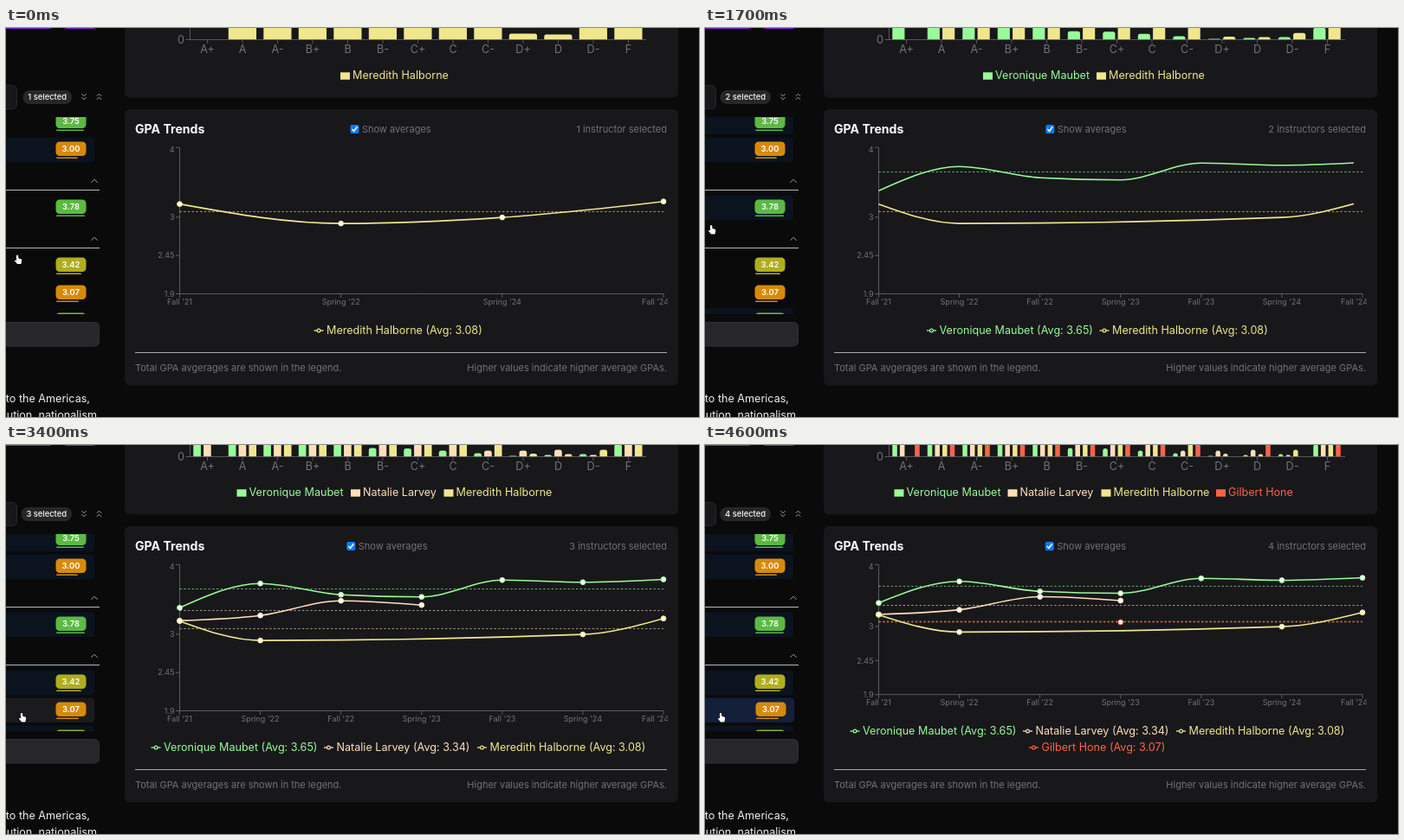
These frames come from a looping animation (800 by 450 pixels, 4700 ms). An HTML page with a canvas:

```html
<!DOCTYPE html>
<html lang="en">
<head>
<meta charset="utf-8">
<title>GPA Trends</title>
<style>
html, body { margin: 0; width: 100%; height: 100%; overflow: hidden; background: #0a0a0b; }
canvas { display: block; width: 800px; height: 450px; }
</style>
</head>
<body>
<canvas id="stage" width="800" height="450"></canvas>
<script>
const ctx = document.getElementById('stage').getContext('2d');
const LOOP = 4700, DRAW = 900;
const CLICKS = [957, 2342, 3462];
const ZOOM = 0.786; // layout pixels to stage pixels
const GRADES = ['A+', 'A', 'A-', 'B+', 'B', 'B-', 'C+', 'C', 'C-', 'D+', 'D', 'D-', 'F'];
const TERMS = ["Fall '21", "Spring '22", "Fall '22", "Spring '23", "Fall '23", "Spring '24", "Fall '24"];

// from: the state in which the instructor is first selected; gpa: [term, value]
const PEOPLE = [
  { name: 'Veronique Maubet', color: '#98fb98', from: 1, avg: 3.65,
    bars: [90, 60, 57, 25, 22, 10, 9.5, 7, 4, 1, 2, 3, 14],
    gpa: [[0, 3.38], [1, 3.728], [2, 3.567], [3, 3.536], [4, 3.777], [5, 3.746], [6, 3.787]] },
  { name: 'Natalie Larvey', color: '#ffdfb8', from: 2, avg: 3.34,
    bars: [40, 80, 70, 60, 50, 30, 24, 28, 7, 7, 8, 2, 24],
    gpa: [[0, 3.195], [1, 3.269], [2, 3.48], [3, 3.418]] },
  { name: 'Meredith Halborne', color: '#f0e68c', from: 0, avg: 3.08,
    bars: [0, 90, 75, 65, 70, 34, 25, 18, 20, 3.5, 3, 8, 17],
    gpa: [[0, 3.189], [1, 2.91], [5, 2.997], [6, 3.226]] },
  { name: 'Gilbert Hone', color: '#ff6347', from: 3, avg: 3.07,
    bars: [16, 60, 27, 23, 45, 22, 40, 40, 40, 0, 23, 0, 24],
    gpa: [[3, 3.07]] }
];
const BAR_LEGEND = [[386], [321, 452], [266.5, 398, 505.5], [218.5, 349.5, 457.5, 590]];
const LINE_LEGEND = [[355.5], [256, 455.5], [167.5, 367, 544], [167.5, 367, 544, 374]];

const GREEN = '#5cb944', ORANGE = '#d68a0c', OLIVE = '#b0ae1f';
const ROWS = [
  { y: 94, gpa: '3.75', color: GREEN, bar: 32, from: 1 },
  { y: 126, gpa: '3.00', color: ORANGE, bar: 25, from: 0 },
  { y: 193, gpa: '3.78', color: GREEN, bar: 33, from: 1 },
  { y: 260, gpa: '3.42', color: OLIVE, bar: 29, from: 2 },
  { y: 292, gpa: '3.07', color: ORANGE, bar: 26, from: 3 },
  { y: 324, gpa: '3.65', color: '#86b52c', bar: 31, from: 1 }
];
// start time, end time, destination of the fingertip
const MOVES = [[300, 850, 1.5, 210.5], [1500, 2100, 23, 277.3], [2750, 3150, 18, 309.8]];

function text(str, x, y, size, color, align = 'left', weight = 400) {
  ctx.font = `${weight} ${size}px Inter, sans-serif`;
  ctx.textAlign = align;
  ctx.fillStyle = color;
  ctx.fillText(str, x, y);
}

function box(x, y, w, h, r, fill, stroke) {
  ctx.beginPath();
  ctx.roundRect(x, y, w, h, r);
  ctx.fillStyle = fill;
  ctx.fill();
  if (stroke) { ctx.lineWidth = 1; ctx.strokeStyle = stroke; ctx.stroke(); }
}

function line(points, color, width = 1) {
  ctx.beginPath();
  points.forEach(([x, y]) => ctx.lineTo(x, y));
  ctx.strokeStyle = color;
  ctx.lineWidth = width;
  ctx.stroke();
}

function dot(x, y, r, fill, stroke, width = 1) {
  ctx.beginPath();
  ctx.arc(x, y, r, 0, 7);
  ctx.fillStyle = fill;
  ctx.fill();
  ctx.strokeStyle = stroke;
  ctx.lineWidth = width;
  ctx.stroke();
}

function clipped(x, y, w, h, draw) {
  ctx.save();
  ctx.beginPath();
  ctx.rect(x, y, w, h);
  ctx.clip();
  draw();
  ctx.restore();
}

// cubic-bezier(.25, .1, .25, 1)
function ease(t) {
  if (t >= 1) return 1;
  let lo = 0, hi = 1, s = 0.5;
  for (let i = 0; i < 20; i++) {
    s = (lo + hi) / 2;
    if (0.75 * s * (1 - s) + s ** 3 < t) lo = s; else hi = s;
  }
  return 0.3 * s * (1 - s) ** 2 + 3 * s * s * (1 - s) + s ** 3;
}

function monotoneCurve(pts) {
  const n = pts.length - 1;
  const h = [], s = [], m = [];
  for (let i = 0; i < n; i++) {
    h[i] = pts[i + 1][0] - pts[i][0];
    s[i] = (pts[i + 1][1] - pts[i][1]) / h[i];
  }
  for (let i = 1; i < n; i++) {
    const p = (s[i - 1] * h[i] + s[i] * h[i - 1]) / (h[i - 1] + h[i]);
    m[i] = (Math.sign(s[i - 1]) + Math.sign(s[i])) *
      Math.min(Math.abs(s[i - 1]), Math.abs(s[i]), Math.abs(p) / 2);
  }
  m[0] = (3 * s[0] - m[1]) / 2;
  m[n] = (3 * s[n - 1] - m[n - 1]) / 2;
  ctx.beginPath();
  ctx.moveTo(...pts[0]);
  for (let i = 0; i < n; i++) {
    const [x0, y0] = pts[i], [x1, y1] = pts[i + 1], d = h[i] / 3;
    ctx.bezierCurveTo(x0 + d, y0 + m[i] * d, x1 - d, y1 - m[i + 1] * d, x1, y1);
  }
}

function cursorAt(t) {
  let x = 13, y = 262.5;
  for (const [start, end, toX, toY] of MOVES) {
    const u = Math.min(1, Math.max(0, (t - start) / (end - start)));
    const k = u * u * (3 - 2 * u);
    x += (toX - x) * k;
    y += (toY - y) * k;
  }
  return [x, y];
}

function drawCursor([x, y]) {
  ctx.save();
  ctx.translate(x, y);
  ctx.beginPath();
  ctx.moveTo(-1.2, 1);
  ctx.quadraticCurveTo(0, -1, 1.2, 1);
  ctx.lineTo(1.4, 4);
  ctx.lineTo(4.4, 4.8);
  ctx.quadraticCurveTo(5.4, 5.2, 5.2, 7);
  ctx.lineTo(4.4, 10.6);
  ctx.lineTo(0, 10.6);
  ctx.lineTo(-3, 7);
  ctx.quadraticCurveTo(-3, 5.4, -1, 6.4);
  ctx.closePath();
  ctx.strokeStyle = '#000';
  ctx.lineWidth = 1.4;
  ctx.stroke();
  ctx.fillStyle = '#fff';
  ctx.fill();
  ctx.restore();
}

function chevron(x, y, dir, r = 3) {
  line([[x - r, y - dir * r / 2], [x, y + dir * r / 2], [x + r, y - dir * r / 2]], '#a1a1aa');
}

function drawSidebar(state, cursor) {
  box(-20, -20, 74, 21, 4, '#7e22ce');
  box(66.5, -20, 38, 21, 4, '#7e22ce');
  box(-10, 66.5, 22.5, 27, 5, '#18181b', '#27272a');

  const label = `${state + 1} selected`;
  ctx.font = '500 9.4px Inter, sans-serif';
  const w = ctx.measureText(label).width;
  box(64 - w, 72, w + 12, 16, 8, '#27272a');
  text(label, 70, 83.3, 9.4, '#fafafa', 'right', 500);
  for (const d of [-2, 2]) {
    chevron(90, 79.5 + d, 1, 2.6);
    chevron(107.5, 79.5 + d, -1, 2.6);
  }

  clipped(0, 103, 110, 228, () => {
    for (const row of ROWS) {
      const selected = state >= row.from;
      const hover = cursor[1] > row.y + 4 && cursor[1] < row.y + 29;
      const dx = selected && hover ? 1 : 0;
      if (selected || hover) {
        const fill = !selected ? '#1b1b1e' : hover ? '#14203a' : '#0a131e';
        box(-10, row.y + 0.5, 112 + dx, 28.5, 4, fill);
      }
      box(57.5 + dx, row.y + 5.5, 35, 16.5, 4.5, row.color);
      text(row.gpa, 75 + dx, row.y + 17, 9.4, '#fff', 'center', 600);
      box(58 + dx, row.y + 23.4, row.bar, 1.6, 0.8, row.color);
    }
  });
  for (const y of [177, 244]) {
    chevron(102, y, -1, 3.6);
    line([[0, y + 10.5], [108, y + 10.5]], '#b8b8bc');
  }
  box(-10, 340.5, 117.5, 27.5, 5, '#27272a', '#303034');
  text('to the Americas,', 97, 433, 12.6, '#f0f0f0', 'right');
  text('ution, nationalism', 105, 451.5, 12.6, '#f0f0f0', 'right');
}

function drawBars(state, people, progress) {
  box(137, -20, 639, 100.5, 6, '#18181b');
  const step = 40.5, n = people.length;
  const gap = 4 * ZOOM;
  const width = Math.floor((step * 0.8 / ZOOM - 4 * (n - 1)) / n) * ZOOM;
  // bars grow from zero unless their slot already held the same person
  const before = PEOPLE.filter(p => p.from < state);
  GRADES.forEach((grade, i) => {
    const mid = 232.5 + i * step;
    people.forEach((p, k) => {
      const h = p.bars[i] * (state === 0 ? 2 : before[k] === p ? 1 : progress);
      const x = mid - step * 0.4 + k * (width + gap);
      const r = Math.min(2.5, h, width / 2);
      if (h) box(x, 13.5 - h, width, h, [r, r, 0, 0], p.color);
    });
    line([[mid, 13.5], [mid, 18]], '#666', 0.8);
    text(grade, mid, 28.5, 12.6, '#71717a', 'center');
  });
  line([[207.5, 13.5], [739, 13.5]], '#666', 0.8);
  line([[212.5, 0], [212.5, 13.5]], '#666', 0.8);
  text('0', 206, 18, 12.6, '#71717a', 'right');
  people.forEach((p, k) => {
    const x = BAR_LEGEND[state][k];
    box(x, 51.3, 11, 8.4, 0, p.color);
    text(p.name, x + 14, 59.3, 12.6, p.color);
  });
}

function drawTrends(state, people, progress) {
  const left = 200.5, right = 759, top = 138.3;
  const bottom = state === 3 ? 288.7 : 307.5;
  const terms = state ? TERMS : [0, 1, 5, 6].map(i => TERMS[i]);
  const termX = i => left + (right - left) * terms.indexOf(TERMS[i]) / (terms.length - 1);
  const gpaY = v => bottom - (v - 1.9) / 2.1 * (bottom - top);
  const gray = '#71717a';

  box(137, 94, 639, 319.5, 6, '#18181b');
  text('GPA Trends', 149, 122, 14.1, '#fafafa', 'left', 700);
  const checkX = [397.5, 393.3, 393.3, 392.8][state];
  box(checkX, 112, 10, 10, 2, '#0a7cff');
  line([[checkX + 2, 117], [checkX + 4.2, 119.3], [checkX + 8, 114.3]], '#fff', 1.5);
  text('Show averages', checkX + 13.4, 121.2, 11, gray);
  text(`${state + 1} instructor${state ? 's' : ''} selected`, 763, 121.2, 11, gray, 'right');

  line([[left, top], [left, bottom], [right, bottom]], '#666', 0.9);
  for (const v of [4, 3, 2.45, 1.9]) {
    const y = gpaY(v);
    line([[left - 4.5, y], [left, y]], '#666', 0.9);
    text(v, 194.5, v === 4 ? 144.3 : y + 3.3, 9, gray, 'right');
  }
  clipped(137, 94, 626.5, 320, () => terms.forEach((term, i) => {
    const x = left + (right - left) * i / (terms.length - 1);
    const last = i === terms.length - 1;
    line([[x, bottom], [x, bottom + 4.5]], '#666', 0.9);
    text(term, last ? 765 : x, bottom + 12.7, 9, gray, last ? 'right' : 'center');
  }));

  ctx.setLineDash([3 * ZOOM, 3 * ZOOM]);
  ctx.globalAlpha = 0.75;
  for (const p of people) {
    line([[left, gpaY(p.avg)], [right, gpaY(p.avg)]], p.color, 0.9);
  }
  ctx.globalAlpha = 1;
  ctx.setLineDash([]);

  for (const p of people) {
    const pts = p.gpa.map(([i, v]) => [termX(i), gpaY(v)]);
    const span = pts[pts.length - 1][0] - pts[0][0];
    if (span) clipped(pts[0][0] - 1, 94, span * progress + 1, 230, () => {
      monotoneCurve(pts);
      ctx.strokeStyle = p.color;
      ctx.lineWidth = 2 * ZOOM;
      ctx.stroke();
    });
    if (progress === 1) pts.forEach(([x, y]) => dot(x, y, 2.9, '#fff', p.color));
  }

  people.forEach((p, k) => {
    const x = LINE_LEGEND[state][k];
    const y = state === 3 && k < 3 ? 330.5 : 349.5;
    line([[x, y + 0.5], [x + 11, y + 0.5]], p.color, 1.3);
    dot(x + 5.5, y + 0.5, 1.9, '#18181b', p.color, 1.2);
    text(`${p.name} (Avg: ${p.avg})`, x + 14.5, y + 4, 12.6, p.color);
  });

  line([[149, 375.5], [763, 375.5]], '#a8a8ac');
  text('Total GPA avgerages are shown in the legend.', 149, 397, 11, gray);
  text('Higher values indicate higher average GPAs.', 763, 397, 11, gray, 'right');
}

function render(t) {
  const state = CLICKS.filter(c => t >= c).length;
  const progress = state ? ease((t - CLICKS[state - 1]) / DRAW) : 1;
  const people = PEOPLE.filter(p => p.from <= state);
  const cursor = cursorAt(t);
  ctx.fillStyle = '#0a0a0b';
  ctx.fillRect(0, 0, 800, 450);
  drawSidebar(state, cursor);
  drawBars(state, people, progress);
  drawTrends(state, people, progress);
  drawCursor(cursor);
}

const start = performance.now();
function tick() {
  render((performance.now() - start) % LOOP);
  requestAnimationFrame(tick);
}
tick();
</script>
</body>
</html>
```
